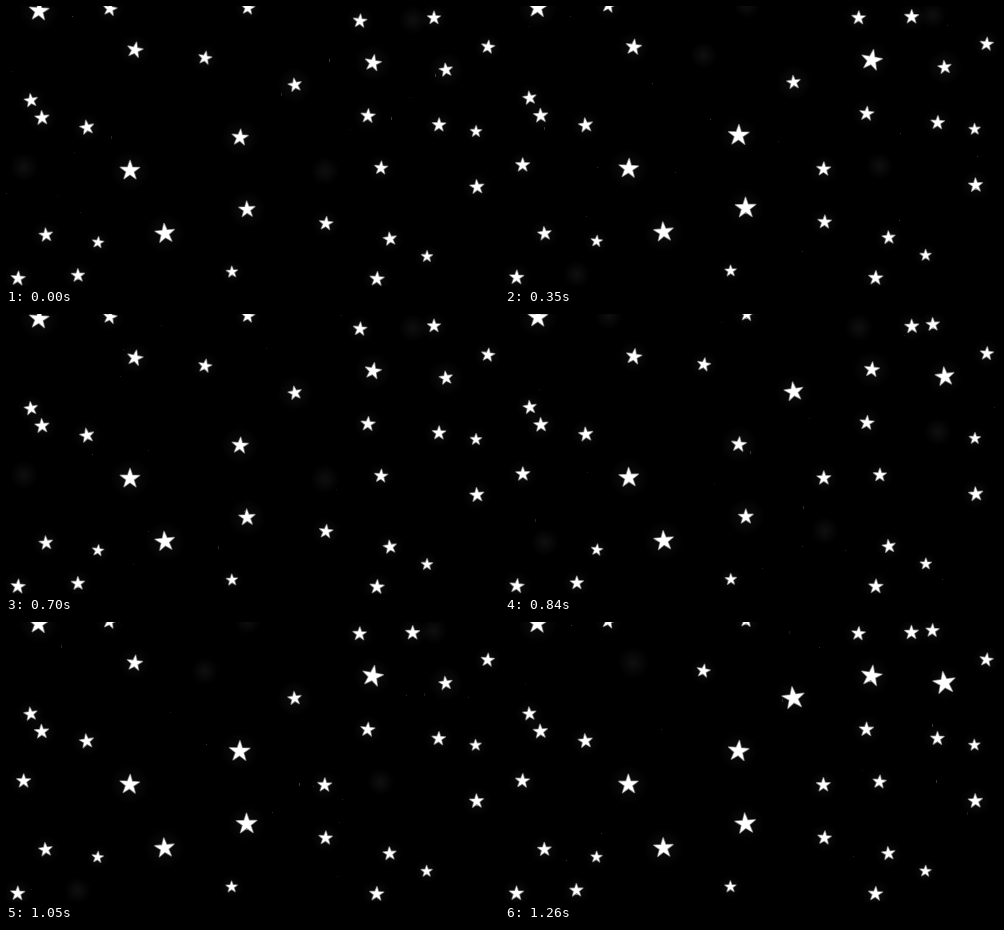
An HTML page with a canvas that plays this animation: 493x280 px, repeating every 1330 ms.

```html
<!DOCTYPE html>
<html lang="en">
<head>
<meta charset="utf-8">
<title>Twinkling stars</title>
<style>
  html, body { margin: 0; width: 100%; height: 100%; overflow: hidden; background: #000; }
  canvas { display: block; }
</style>
</head>
<body>
<canvas id="sky" width="493" height="280"></canvas>
<script>
const ctx = document.getElementById('sky').getContext('2d');
const W = 493, H = 280, STEP = 70, STEPS = 19, CYCLE = 10;

// Stars grouped by behaviour: swelling, flickering, steady, or dark for one phase
const groups = [
  { size: 10, pulse: 2, beats: 1, at: [[367, 57], [234, 131.5], [241, 203.5]] },
  { size: 9.4, pulse: 2.6, beats: 2, at: [[289, 79], [440, 64]] },
  { size: 10.6, at: [[33, 5], [124, 164.5], [159, 227.5]] },
  { size: 7.7, at: [[36, 112], [81, 121.5], [362, 110], [471, 181], [371, 273], [12, 272.5]] },
  { size: 6.2, at: [[470, 125.5], [92, 236.5], [421, 250.5], [226, 266]] },
  { size: 7.6, dark: 0, at: [[407, 14], [18, 161], [319, 165]] },
  { size: 7.4, dark: 2, at: [[104, 3], [354, 15], [433, 119], [320, 217.5], [40, 229]] },
  { size: 7.2, dark: 5, at: [[242, 2], [428, 12], [199, 52], [375, 162], [72, 269.5]] },
  { size: 7.2, dark: 7, at: [[482, 41], [25, 94.5], [384, 233]] },
  { size: 8.4, dark: 8, at: [[129, 44]] }
];

const random = seed => {
  const v = Math.sin(seed * 127.1 + 11.7) * 43758.5453;
  return v - Math.floor(v);
};

function drawGlow(x, y, r) {
  const glow = ctx.createRadialGradient(x, y, 0, x, y, r);
  glow.addColorStop(0, 'rgba(255,255,255,.06)');
  glow.addColorStop(1, 'rgba(255,255,255,0)');
  ctx.fillStyle = glow;
  ctx.fillRect(x - r, y - r, 2 * r, 2 * r);
}

// A white star with a soft edge
function drawStar(x, y, r, turn) {
  ctx.beginPath();
  for (let i = 0; i < 10; i++) {
    const a = turn + i * Math.PI / 5, d = i % 2 ? r * .37 : r - .5;
    ctx.lineTo(x + d * Math.sin(a), y - d * Math.cos(a));
  }
  ctx.closePath();
  ctx.fillStyle = '#fff';
  ctx.strokeStyle = 'rgba(255,255,255,.45)';
  ctx.lineWidth = 1.6;
  ctx.lineJoin = 'round';
  ctx.fill();
  ctx.stroke();
}

function drawDust(step) {
  for (let i = 0; i < 14; i++) {
    const seed = i + step * 31;
    ctx.fillStyle = `rgba(255,255,255,${.08 + .16 * random(seed + .7)})`;
    ctx.fillRect(Math.floor(random(seed + .1) * W), Math.floor(random(seed + .4) * H),
      1, random(seed + .2) > .7 ? 3 : 1);
  }
}

function draw(step) {
  const phase = step % CYCLE;
  const lift = 3.6 * Math.sin(Math.PI * phase / 14);
  ctx.fillStyle = '#000';
  ctx.fillRect(0, 0, W, H);
  drawDust(step);
  for (const { size, pulse = 0, beats = 1, dark, at } of groups) {
    const r = size - pulse * Math.cos(beats * (phase + beats - 2.5) * Math.PI / 5);
    for (const [x0, y0] of at) {
      const x = x0 - phase / 14, y = y0 - lift * (1 - y0 / 400);
      drawGlow(x, y, size * 1.9);
      const turn = (random(x0) - .5) * .3 + (random(x0 + phase) - .5) * .1;
      if (phase !== dark) drawStar(x, y, r, turn);
    }
  }
}

function tick() {
  draw(Math.floor(performance.now() / STEP) % STEPS);
  requestAnimationFrame(tick);
}
tick();
</script>
</body>
</html>
```
